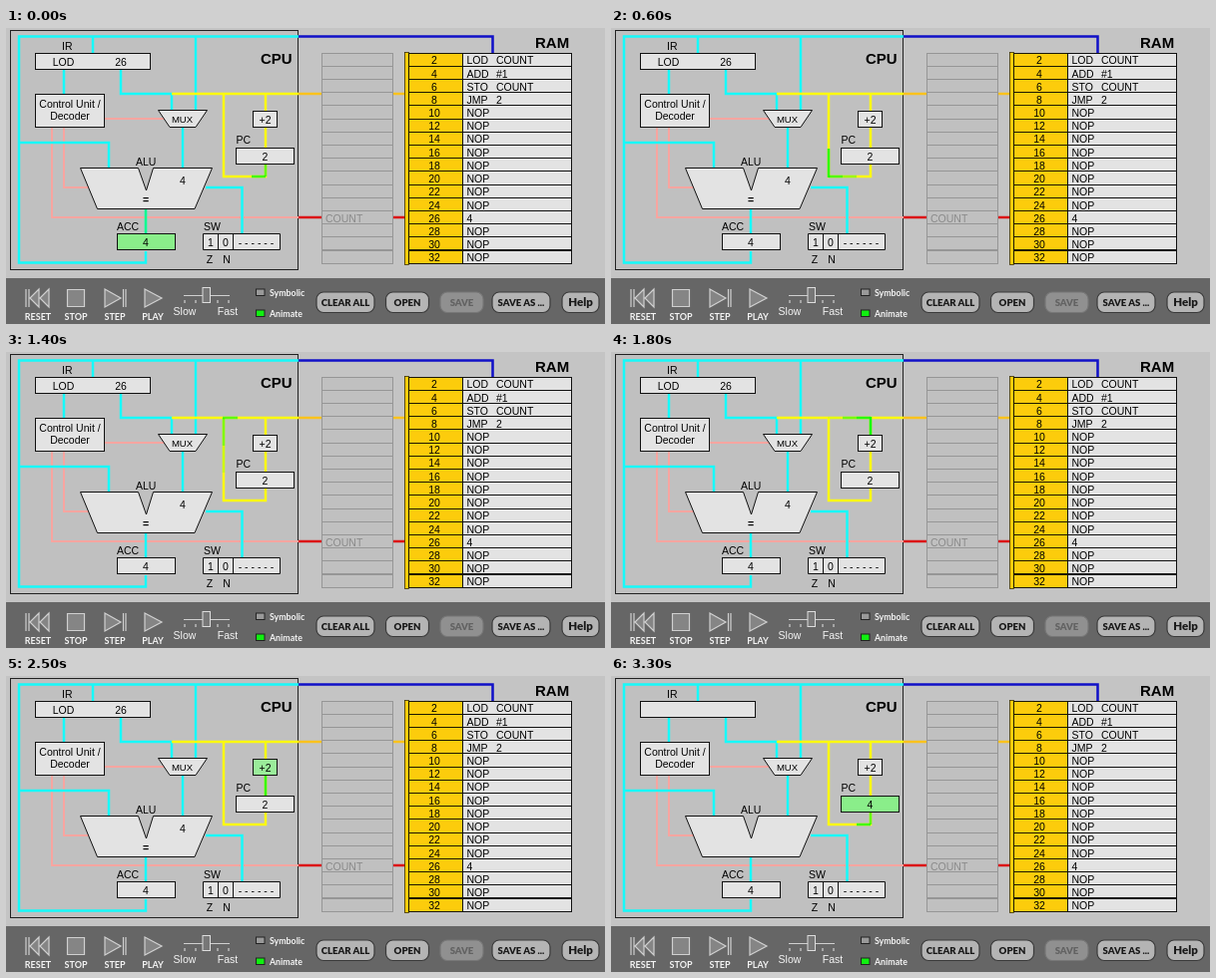
Write an HTML page that moves like this. It is 600 px wide and 297 px high and loops after 3400 ms.

```html
<!DOCTYPE html>
<html lang="en">
<head>
<meta charset="utf-8">
<title>CPU simulator</title>
<style>
html, body { margin: 0; width: 100%; height: 100%; overflow: hidden; background: #c4c4c4; }
svg { display: block; width: 600px; height: 297px; }
text { font: 10.5px "Liberation Sans", Arial, sans-serif; fill: #000; white-space: pre; }
.mid { text-anchor: middle; }
.title { font-size: 15px; font-weight: bold; }
.wire { fill: none; stroke-width: 2.5; }
.cyan { stroke: #16fafa; }
.pink { stroke: #f8a5a0; stroke-width: 2; }
.yellow { stroke: #fffa0a; }
.gold { stroke: #fbc21c; }
.red { stroke: #dc1014; }
.blue { stroke: #1010c8; }
.box { fill: #e3e3e3; stroke: #111; stroke-width: 1; }
.glow { stroke: #0f0; opacity: 0; }
.fill { fill: #0f0; stroke: none; opacity: 0; }
.icon { fill: #858585; stroke: #d0d0d0; stroke-width: 1.2; }
.bar text { font: bold 9px Lato, "Open Sans", sans-serif; fill: #f4f4f4; }
.bar .speed { font: 10.5px "Liberation Sans", Arial, sans-serif; }
.bar .option { font-size: 8.8px; }
.bar .button { font-size: 9.6px; font-weight: 900; fill: #181818; }
</style>
</head>
<body>
<svg viewBox="0 0 600 297">
  <rect width="600" height="297" fill="#c4c4c4"/>
  <rect x="4.5" y="2.5" width="288" height="240" fill="#c0c0c0" stroke="#222"/>

  <g class="wire">
    <path class="pink" d="M99 91H159M58 100V160H84M46 100V190H293"/>
    <path class="cyan" d="M293 8.5H13V235.500H140V224M87 8V25M190 8V83M13 115H103V141M58 42V66M115 42V66H166V83M177 100V141M200 160H236.500V207M140 182V207"/>
    <path class="blue" d="M293 8.500H487.500V25"/>
    <path class="yellow" d="M166 66H293M218 66V149H260V137M260 66V83M260 100V121"/>
    <path class="gold" d="M293 66H317M388 66H400"/>
    <path class="red" d="M293 190H317M388 190H400"/>
  </g>
  <g class="wire" id="pulses"></g>

  <g class="box">
    <rect x="29.5" y="25.5" width="115" height="16"/>
    <rect x="29.5" y="66.5" width="69" height="33"/>
    <path d="M152.500 82.500H201.500L190 99.500H164Z"/>
    <rect x="247.500" y="83.500" width="24" height="16"/>
    <rect x="230.500" y="120.500" width="58" height="16"/>
    <path d="M74.500 140.500H132.500L140.500 163L147.500 140.500H206.500L189 181.500H91.500Z"/>
    <rect x="111.500" y="206.500" width="58" height="16"/>
    <path d="M197.500 206.500H274.500V222.500H197.500ZM212.500 206.500V222.500M227.500 206.500V222.500"/>
  </g>
  <rect class="fill" id="adder" x="248" y="84" width="23" height="15"/>
  <rect class="fill" id="counter" x="231" y="121" width="57" height="15"/>
  <rect class="fill" id="acc" x="112" y="207" width="57" height="15"/>

  <text x="56" y="22">IR</text>
  <text x="230.500" y="116">PC</text>
  <text x="130" y="137.500">ALU</text>
  <text x="111" y="203">ACC</text>
  <text x="198" y="203">SW</text>
  <text class="title" x="255" y="36">CPU</text>
  <text class="title" x="530" y="20">RAM</text>
  <g class="mid">
    <text x="64" y="80">Control Unit /</text>
    <text x="64" y="92">Decoder</text>
    <text x="176.500" y="95" style="font-size:9.500px">MUX</text>
    <text x="259.500" y="95.500">+2</text>
    <text x="259.500" y="132.500" id="pc">2</text>
    <text x="140" y="218.500">4</text>
    <text x="205" y="218.500">1</text>
    <text x="220" y="218.500">0</text>
    <text x="250.500" y="218.500">- - - - - -</text>
    <text x="204" y="236">Z</text>
    <text x="221" y="236">N</text>
    <g id="operands">
      <text x="57.500" y="38">LOD</text>
      <text x="115" y="38">26</text>
      <text x="177" y="156.500">4</text>
      <text x="140" y="175.500" style="font-weight:bold">=</text>
    </g>
  </g>

  <rect x="399.500" y="24.500" width="4" height="213" fill="#fccc0c" stroke="#3a3000" stroke-width=".8"/>
  <g id="memory"></g>

  <g class="bar">
    <rect y="251" width="600" height="46" fill="#666"/>
    <g class="icon">
      <path d="M20 262V280M23 262V280M33 262L24 271L33 280ZM43 262L34 271L43 280Z"/>
      <path d="M61.500 262.500H78.500V279.500H61.500Z"/>
      <path d="M99 262L115 271L99 280ZM117.500 262V280M120 262V280"/>
      <path d="M139 262L156 271L139 280Z"/>
      <path d="M178 268.500H224M179 273V276M190 273V276M212 273V276M223 273V276"/>
    </g>
    <rect x="197" y="260.500" width="7.500" height="15" fill="#777" stroke="#ddd"/>
    <g class="mid">
      <text x="32" y="293">RESET</text>
      <text x="70" y="293">STOP</text>
      <text x="109" y="293">STEP</text>
      <text x="147" y="293">PLAY</text>
      <text class="speed" x="179" y="287.500">Slow</text>
      <text class="speed" x="222" y="287.500">Fast</text>
    </g>
    <rect x="250.500" y="262" width="8.500" height="6.500" fill="#999" stroke="#222"/>
    <rect x="250.500" y="283" width="8.500" height="6.500" fill="#10f010" stroke="#222"/>
    <text class="option" x="264" y="268.500">Symbolic</text>
    <text class="option" x="264" y="289.500">Animate</text>
    <g id="buttons"></g>
  </g>
</svg>
<script>
const $ = id => document.getElementById(id);

function add(parent, tag, attrs, text = "") {
  const el = document.createElementNS("http://www.w3.org/2000/svg", tag);
  for (const key in attrs) el.setAttribute(key, attrs[key]);
  el.textContent = text;
  return parent.appendChild(el);
}

// Bus column, addresses and memory cells
const memory = $("memory");
const program = [["LOD", "COUNT"], ["ADD", "#1"], ["STO", "COUNT"], ["JMP", "2"]];
const rowHeight = 13.2;
for (let i = 0; i < 16; i++) {
  const top = 25 + i * rowHeight;
  const y = Math.floor(top) + 0.5;
  const height = Math.floor(top + rowHeight) + 0.5 - y;
  const base = Math.round(top + 11.3);
  const cell = (x, width, fill, stroke) =>
    add(memory, "rect", { x, y, width, height, fill, stroke });
  cell(316.5, 71, "#c0c0c0", "#969696");
  cell(403.5, 54, "#fccc0c", "#1c1800");
  cell(457.5, 109, "#e3e3e3", "#111");
  add(memory, "text", { x: 429, y: base, class: "mid" }, 2 * i + 2);
  const [op, arg = ""] = program[i] || [i === 12 ? "4" : "NOP"];
  add(memory, "text", { x: 461.5, y: base }, op);
  add(memory, "text", { x: 491, y: base }, arg);
  if (i === 12) add(memory, "text", { x: 320, y: base, style: "fill:#8a8a8a" }, "COUNT");
}

for (const [x, width, label, style = ""] of [
  [311, 58, "CLEAR ALL"], [380.5, 43, "OPEN"], [435, 43, "SAVE", "fill:#626262"],
  [487, 58, "SAVE AS ..."], [557, 37, "Help", "font-size:11.5px"]
]) {
  const off = label === "SAVE";
  add($("buttons"), "rect", {
    x, y: 265, width, height: 20.5, rx: 7,
    fill: off ? "#909090" : "#b4b4b4", stroke: off ? "#777" : "#3a3a3a", "stroke-width": 1.2
  });
  add($("buttons"), "text", { x: x + width / 2, y: 279, class: "button mid", style }, label);
}

// Each stage of the signal lights up one step after the last and fades out
const loop = 3400, step = 330, start = -200, lead = 100;
const lineFade = 750, boxFade = 870;
const lights = [];
const at = n => start + n * step;
const light = (el, time, fade) => lights.push({ el, time, fade });
const pulse = (d, time) => light(add($("pulses"), "path", { d, class: "glow" }), time, lineFade);

function corner(n, first, second) {
  pulse(first, at(n) - lead);
  pulse(second, at(n));
}

for (const n of [0, 10]) corner(n, "M260 137V149", "M260 149H246");
pulse("M246 149H232", at(1));
corner(2, "M232 149H218", "M218 150V121");
pulse("M218 121V94", at(3));
corner(4, "M218 94V66", "M217 66H232");
pulse("M232 66H246", at(5));
corner(6, "M246 66H260", "M260 65V83");
light($("adder"), at(7) - 2 * lead, boxFade);
pulse("M260 100V121", at(8) - lead);
light($("counter"), at(9), boxFade);
light($("acc"), at(-1), boxFade);
pulse("M140 182V207", at(-1) + lead);

function draw(now) {
  const t = Math.floor(now % loop / 100) * 100;
  for (const { el, time, fade } of lights) {
    const age = t - time;
    el.style.opacity = age < 0 ? 0 : Math.max(0, 1 - age / fade);
  }
  const done = t >= at(9);
  $("pc").textContent = done ? "4" : "2";
  $("operands").style.display = done ? "none" : "";
}

let origin;
function tick(now) {
  origin ??= now;
  draw(now - origin);
  requestAnimationFrame(tick);
}
draw(0);
requestAnimationFrame(tick);
</script>
</body>
</html>
```
